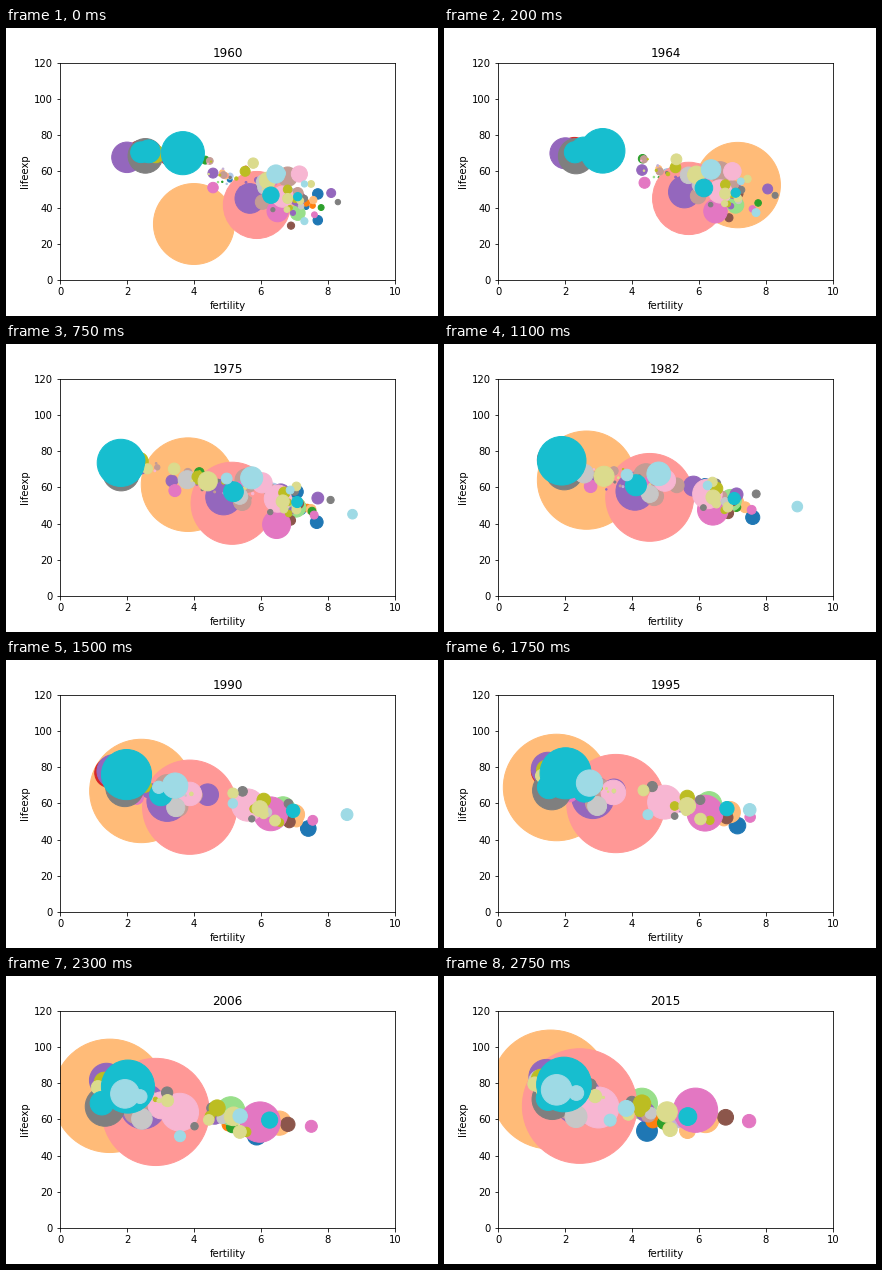
A matplotlib script for the animation above (2800 ms loop, 432 by 288 pixels).

```python
import numpy as np
import matplotlib.pyplot as plt
from matplotlib.animation import FuncAnimation

FIRST, LAST = 1960, 2015
YEARS = np.arange(FIRST, LAST + 1)
TIME = (YEARS - FIRST) / (LAST - FIRST)
EASED = TIME ** 0.75

bubbles = []  # (colour index, size, fertility, life) with one value per year


def path(*values):
    """Straight lines through values spread evenly over the years."""
    return np.interp(TIME, np.linspace(0, 1, len(values)), values)


def rise(start, end):
    return start + (end - start) * EASED


def fall(start, end, mid, width=7):
    """S-curve from start to end, steepest in the year mid."""
    s = 1 / (1 + np.exp((mid - YEARS) / width))
    return start + (end - start) * (s - s[0]) / (s[-1] - s[0])


def add(hue, millions, fert, life):
    """Population grows with the mean number of children."""
    growth = 0.15 + 0.67 * fert.mean()
    bubbles.append((hue, 10 * millions * growth ** EASED, fert, life))


def country(hue, millions, start, end, mid, life0, life1=None):
    """A typical course; fewer children at the end mean longer lives."""
    if life1 is None:
        life1 = 77 - 3 * (end - 1.5)
    add(hue, millions, fall(start, end, mid), rise(life0, life1))


# The biggest bubbles
add(3, 655, np.interp(YEARS, (1960, 1961, 1963, 1968, 1972, 1978, 1990, 1995, 2000, 2015),
                      (4.0, 3.3, 7.4, 6.2, 4.9, 2.75, 2.43, 1.75, 1.43, 1.57)),
    np.interp(YEARS, (1960, 1963, 1969, 1990, 2015), (30.9, 51, 59.3, 66.8, 76.4)))
add(7, 450, path(5.88, 5.25, 4.05, 3.08, 2.44), rise(41.4, 67.3))
add(8, 93, path(2.0, 2.05, 1.65, 1.36, 1.44), rise(67.7, 83.5))
add(12, 45, fall(6.5, 5.9, 1995), path(38, 38, 54, 55, 65))
add(14, 120, path(2.55, 1.8, 2.1, 1.2, 1.62), path(68.5, 68, 69.5, 65, 71))
add(18, 43, path(2.42, 2.0, 2.0, 1.12, 1.5), path(70.5, 70.5, 70.5, 67.5, 71.5))
country(18, 52, 2.65, 1.8, 1971, 71, 81)
add(18, 186, path(3.67, 1.8, 1.97, 2.06, 1.97), rise(70, 79.2))

# Asia
country(0, 9, 7.7, 4.45, 2009, 33, 53.6)
country(1, 49, 6.8, 2.1, 1989, 45, 71)
country(8, 88, 5.67, 2.4, 1982, 45, 70.5)
country(8, 22, 7.1, 1.8, 1990, 45)
country(8, 10, 4.57, 2.5, 1970, 59, 71)
country(11, 21, 6.05, 2.1, 1986, 43, 67)
country(12, 11, 4.57, 2.0, 1975, 51, 70)
country(13, 45, 6.65, 3.0, 1997, 46, 66.5)
country(13, 26, 7.15, 2.95, 1981, 58.5, 69)
country(14, 4, 7.3, 2.75, 1993, 45, 79)
country(15, 25, 6.1, 1.25, 1974, 54, 81)
country(16, 10, 5.53, 2.1, 1976, 60)
country(17, 4.6, 7.5, 2.9, 1990, 53)
country(17, 10.8, 5.77, 1.1, 1973, 64.5, 79.5)
country(17, 27, 6.2, 1.5, 1977, 55)
country(18, 27, 6.3, 2.08, 1981, 46.8)
country(19, 33, 6.45, 1.75, 1986, 58.5)
add(19, 5, path(7.3, 8.7, 9.1, 6.2, 3.83), rise(32.5, 66))

# Africa
country(0, 11, 7.7, 2.5, 1988, 47.5)
country(3, 15, 7.1, 6.2, 2007, 43, 60)
country(4, 3.5, 7.8, 4.95, 1990, 40, 58)
country(5, 22, 7.1, 4.3, 2003, 37)
country(8, 8, 8.1, 4.4, 1989, 48, 64)
country(10, 5.2, 6.9, 6.8, 1990, 30)
country(11, 12, 7.1, 2.5, 1985, 48)
country(12, 3.4, 7.6, 7.5, 1990, 36)
country(14, 2.9, 8.3, 4.0, 1995, 43)
country(15, 17, 6.1, 2.33, 1984, 51, 61.5)
country(16, 7.5, 6.8, 4.3, 1997, 50)
country(17, 10, 6.8, 5.05, 1991, 45, 64)
country(18, 6.8, 7.1, 5.67, 2008, 46, 61.5)
add(19, 3.8, fall(7.3, 3.35, 1989), path(53, 58, 63, 46, 59.5))

# America and Europe
country(6, 73, 2.4, 1.4, 1971, 69.5, 81)
country(11, 38, 6.8, 2.2, 1981, 57)
country(16, 30, 2.86, 1.3, 1979, 69.5, 82)
country(19, 8, 6.6, 2.34, 1977, 59)

rng = np.random.default_rng(5)
for _ in range(14):  # slow to change
    start = rng.uniform(6.3, 7.6)
    country(rng.integers(18), rng.uniform(1.5, 6), start,
            start - rng.uniform(1.2, 3), rng.uniform(1991, 2005),
            rng.uniform(36, 48), rng.uniform(53, 66))
for _ in range(52):  # quick to change
    start = rng.uniform(4.3, 7.3)
    country(rng.integers(18), 10 ** rng.uniform(-1.2, 0.8), start,
            rng.uniform(1.6, 3.4), rng.uniform(1974, 1990),
            91 - 6.5 * start + rng.normal(0, 4))
for _ in range(18):  # already settled
    country(rng.integers(18), 10 ** rng.uniform(-1, 1), rng.uniform(2.0, 3.9),
            rng.uniform(1.3, 2.0), rng.uniform(1968, 1980),
            rng.uniform(65, 72), rng.uniform(74, 82))

# Later colours lie on top of earlier ones.
bubbles.sort(key=lambda b: b[0])
hues = [b[0] for b in bubbles]
sizes, ferts, lifes = (np.array([b[k] for b in bubbles]) for k in (1, 2, 3))

fig, ax = plt.subplots(figsize=(6, 4), dpi=72)
fig.subplots_adjust(left=0.125, right=0.9, bottom=0.125, top=0.88)
ax.set(xlim=(0, 10), ylim=(0, 120), xlabel="fertility", ylabel="lifeexp",
       xticks=range(0, 11, 2), yticks=range(0, 121, 20))
title = ax.set_title(str(FIRST))
dots = ax.scatter(ferts[:, 0], lifes[:, 0], s=sizes[:, 0],
                  c=[plt.get_cmap("tab20")(int(h)) for h in hues])


def update(i):
    dots.set_offsets(np.column_stack((ferts[:, i], lifes[:, i])))
    dots.set_sizes(sizes[:, i])
    title.set_text(str(YEARS[i]))
    return dots, title


anim = FuncAnimation(fig, update, frames=len(YEARS), interval=50,
                     repeat=True, repeat_delay=0)
plt.show()
```
